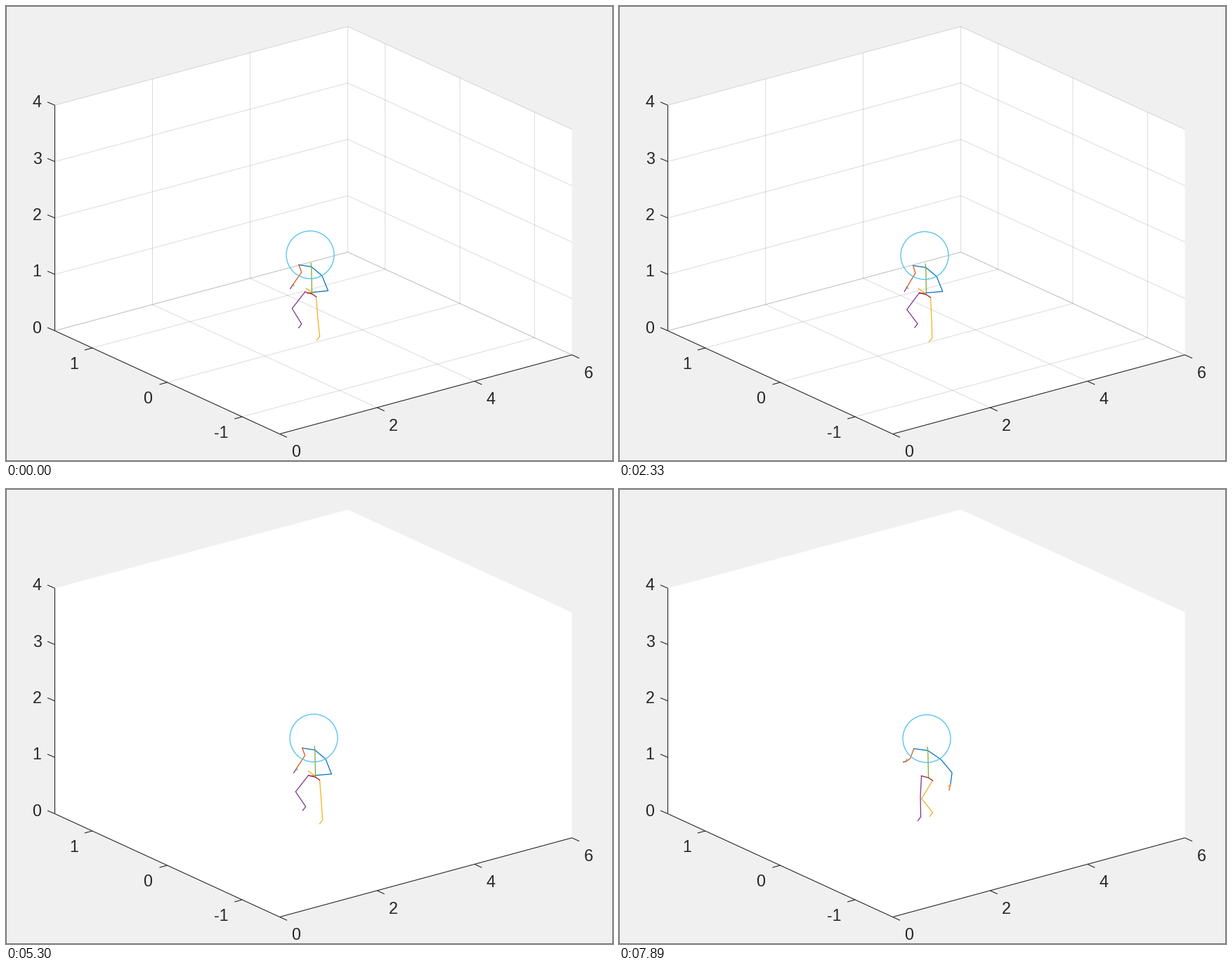
Write a matplotlib script that moves like this. It is 864 px wide and 648 px high and loops after 8 s.

```python
import numpy as np
import matplotlib.pyplot as plt
from matplotlib.animation import FuncAnimation
from matplotlib.patches import Circle, Polygon, Rectangle

W, H, DPI = 864, 648, 72
LOOP_MS, TICK_MS, STEPS = 8000, 40, 56
INK = "#262626"
BLUE, ORANGE, YELLOW, PURPLE = "#0072BD", "#D95319", "#EDB120", "#7E2F8E"
GREEN, CYAN, RED = "#77AC30", "#4DBEEE", "#A2142F"

plt.rcParams["font.family"] = "Liberation Sans"
plt.rcParams["path.snap"] = False
fig = plt.figure(figsize=(W / DPI, H / DPI), dpi=DPI, facecolor="#f0f0f0")
ax = fig.add_axes([0, 0, 1, 1])
ax.set_xlim(-0.5, W - 0.5)
ax.set_ylim(H - 0.5, -0.5)
ax.axis("off")

# Corners of the box on the floor, and the height of one z unit
LEFT, BACK = np.array([69, 462.0]), np.array([486, 350.0])
RIGHT, FRONT = np.array([805, 496.3]), np.array([389, 609.0])
UP = np.array([0, -80.3])


def line(a, b, lw=1.1, **kw):
    return ax.plot([a[0], b[0]], [a[1], b[1]], color=INK, lw=lw,
                   solid_capstyle="butt", **kw)[0]


def label(x, y, s, ha="center"):
    ax.text(x - 1, y + 8.3, s, size=23.3, color=INK, ha=ha, va="baseline")


def mix(a, b, u):
    return a + (b - a) * u


# ---- box, grid, axes ----
walls = [LEFT, LEFT + 4 * UP, BACK + 4 * UP, RIGHT + 4 * UP, RIGHT, FRONT]
ax.add_patch(Polygon(walls, fc="white", ec="none"))

grid = []


def grid_line(a, b):
    grid.append(line(a, b, lw=1, alpha=0.16, zorder=1.5))


for k in range(5):
    grid_line(LEFT + k * UP, BACK + k * UP)
    grid_line(BACK + k * UP, RIGHT + k * UP)
for u in (1 / 3, 2 / 3, 1):
    foot = mix(LEFT, BACK, u)
    grid_line(foot, foot + 4 * UP)
    grid_line(foot, mix(FRONT, RIGHT, u))
for u in (0, 1 / 6, 1 / 2, 5 / 6):
    foot = mix(BACK, RIGHT, u)
    grid_line(foot, mix(LEFT, FRONT, u))
    if u:
        grid_line(foot, foot + 4 * UP)

line(LEFT, LEFT + 4 * UP)
line(LEFT, FRONT)
line(FRONT, RIGHT)
for k in range(5):
    p = LEFT + k * UP
    line(p, p + (-10.5, -4.5))
    label(51, 457 - 80.4 * k, str(k), "right")
for i, s in enumerate(("1", "0", "-1")):
    p = mix(LEFT, FRONT, (2 * i + 1) / 6)
    line(p, p + (-11, 3))
    label(97.5 + 104.5 * i, 508 + 49 * i, s)
for i in range(4):
    p = mix(FRONT, RIGHT, i / 3)
    line(p, p + (10.5, 4.8))
    label(413 + 138.8 * i, 633.5 - 37.6 * i, str(2 * i))
ax.add_patch(Rectangle((0, 0), W - 1, H - 1, fill=False, ec="#6e6e6e", lw=1))

# ---- runner ----
# Gait phase in cycles and sideways place at a few steps
KEY_STEP = [0, 7, 16, 30, 37, 45, 55]
KEY_PHASE = [0, 1.65, 3.92, 7.45, 8.97, 11.08, 13.35]
KEY_X = [435, 434.5, 437, 434, 440, 441, 440]
AHEAD, DOWN = np.array([-69.3, 18.8]), np.array([0, 80.3])


def wave(phase, peak=0.0):
    return np.cos(2 * np.pi * (phase - peak))


def swing(mean, amp, w):
    return np.array(mean) + np.array(amp) * w


def chain(start, *offsets):
    return start + np.cumsum([(0, 0), *offsets], axis=0)


def bone_vec(length, deg):
    """Bone in the plane of travel, tilted ahead of straight down."""
    a = np.radians(deg)
    return length * (np.sin(a) * AHEAD + np.cos(a) * DOWN)


def leg(hip, phase):
    thigh = bone_vec(0.35, 22 + 27 * wave(phase, -0.02))
    shin = bone_vec(0.375, -19 - 18 * wave(phase, 0.87))
    return chain(hip, thigh, shin, bone_vec(0.08, 48))


def left_arm(shoulder, phase):
    w, lift = wave(phase), wave(phase, -0.12)
    elbow = shoulder + swing((-2, 13), (6, -2.5), w)
    wrist = elbow + (-8 - 4 * w, 11.5 + 8 * lift)
    hand = wrist + swing((-4, 4), (0, 3), lift)
    return elbow, wrist, hand, wrist + swing((1, 0), (0, 3), lift)


def right_arm(shoulder, phase):
    w = wave(phase, 0.42)
    elbow = shoulder + swing((12.5, 20), (4, -1.5), wave(phase, 0.45))
    wrist = elbow + (-14 + 12 * wave(phase, 0.38),
                     10 + 8 * wave(phase, 0.45))
    hand = wrist + swing((-4.2, 4.7), (2.5, 4), w)
    return elbow, wrist, hand, wrist + swing((-6, -1.5), (3, 5), w)


def skeleton(step):
    """Neck point and the polylines, in the order of the colours below."""
    phase = np.interp(step, KEY_STEP, KEY_PHASE)
    pelvis = np.array([np.interp(step, KEY_STEP, KEY_X),
                       411.2 - 2.4 * wave(phase, 0.13)])
    twist = wave(phase)
    neck = pelvis + (-1.5, -44)
    chest = neck + (0.7, 5.3)
    sl = pelvis + (-20 + 1.2 * twist, -41.5)
    sr = pelvis + (16.5 - 2.2 * twist, -26)
    el, wl, hl, tl = left_arm(sl, phase)
    er, wr, hr, tr = right_arm(sr, phase)
    ll = leg(pelvis + (-10, -2.7), phase)
    lr = leg(pelvis + (6, 4), phase + 0.5)
    return neck, ([sl, chest, sr, er, wr], [wr, hr], [wr, tr],
                  [sl, el, wl], [wl, hl], [wl, tl],
                  lr, ll, [neck, chest, pelvis], [ll[0], pelvis, lr[0]])


COLORS = (BLUE, ORANGE, YELLOW, ORANGE, PURPLE, GREEN,
          YELLOW, PURPLE, GREEN, RED)
bones = [ax.plot([], [], color=c, lw=1.25, zorder=3)[0] for c in COLORS]
head = ax.add_patch(Circle((0, 0), 34, fill=False, ec=CYAN, lw=1.25, zorder=3))


def draw(i):
    step = int((i * TICK_MS + 30) * STEPS / LOOP_MS) % STEPS
    neck, paths = skeleton(step)
    for b, p in zip(bones, paths):
        b.set_data(*np.array(p).T)
    head.center = tuple(neck + (-1, -11.7))
    # The grid drops out now and then
    for g in grid:
        g.set_visible(step % 9 not in (1, 5))
    return [*bones, head, *grid]


anim = FuncAnimation(fig, draw, frames=LOOP_MS // TICK_MS, interval=TICK_MS,
                     repeat=True, repeat_delay=0, blit=False)
plt.show()
```
